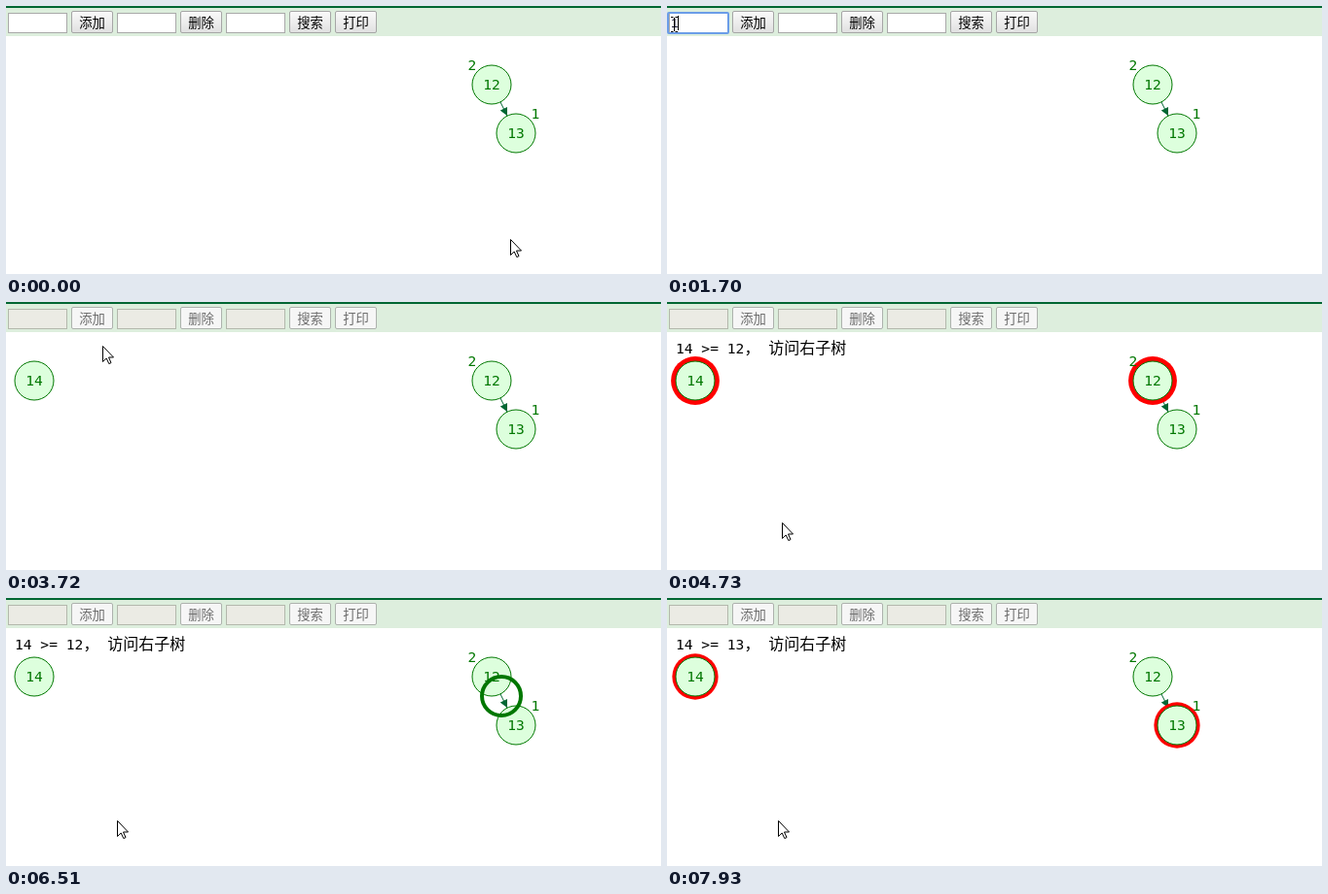
Write an HTML page that moves like this. It is 673x276 px and loops after 8 s.

```html
<!DOCTYPE html>
<html lang="zh-CN">
<head>
<meta charset="utf-8">
<title>AVL</title>
<style>
  html, body { margin: 0; width: 100%; height: 100%; overflow: hidden; background: #fff; }
  svg { display: block; width: 673px; height: 276px; }
  text { font: 16px "Noto Sans CJK SC", "Noto Sans CJK", sans-serif; }
  .mono, .node text, .height { font: 14.6px "DejaVu Sans Mono", monospace; }
  .node text, .button text { text-anchor: middle; }
  .node text, .height { fill: #070; }
  .node .body { fill: #dfd; stroke: #070; }
  .node .halo { fill: #f00; }
  .field { fill: #fff; stroke: #a9a9a9; }
  .button rect { fill: url(#face); stroke: #a6a6a6; }
  .button text { font-size: 13.33px; }
  .disabled .field { fill: #ebebe4; stroke: #b3b8ac; }
  .disabled .button text { fill: #6d6d6d; }
  .disabled .button rect { fill: #f6f6f6; stroke: #adb2ad; }
  #typed { font: 13.33px "Liberation Sans", Arial, sans-serif; fill: #101030; }
</style>
</head>
<body>
<svg viewBox="0 0 673 276">
  <defs>
    <linearGradient id="face" x2="0" y2="1">
      <stop stop-color="#fafafa"/><stop offset="1" stop-color="#e0e0e0"/>
    </linearGradient>
  </defs>
  <rect width="673" height="31" fill="#ded"/>
  <rect width="673" height="2" fill="#063"/>
  <g id="toolbar"></g>
  <rect id="focus" x="1" y="7" width="62" height="21" rx="1" fill="none" stroke="#6b9de8" stroke-width="2"/>
  <text id="typed" x="4" y="22"></text>
  <rect id="caret" y="10" width="1" height="15"/>

  <g id="message">
    <text class="mono" x="9" y="53"></text>
    <text x="79.4" y="53">，</text>
    <text x="104.2" y="53">访问右子树</text>
  </g>
  <path d="M508 99L515 113" stroke="#063"/>
  <path d="M515 113L507.8 107.6L515 104.1Z" fill="#063"/>
  <g id="nodes"></g>
  <text class="height" x="474.6" y="65.5">2</text>
  <text class="height" x="539.6" y="115.5">1</text>
  <circle id="visitor" r="20" fill="none" stroke="#070" stroke-width="4"/>

  <circle id="click" cx="89" cy="21" r="11.5" fill="#ffee30" opacity=".6"/>
  <path id="arrow" d="M.5 .5V16.5L4.2 13L6.8 18.6L9 17.6L6.5 12H11.5Z" fill="#fff" stroke="#000"/>
  <path id="beam" d="M-3 -7.5H-.5M1.5 -7.5H4M.5 -7V7M-3 7.5H-.5M1.5 7.5H4" fill="none" stroke="#000"/>
</svg>
<script>
const LOOP = 8000;
const SUBMIT = 3020, COMPARE_ROOT = 4480, DESCEND = 5940, COMPARE_CHILD = 7365;
const $ = id => document.getElementById(id);

// Toolbar: fields and buttons
const field = x => `<rect class="field" x="${x + .5}" y="7.5" width="60" height="20"/>`;
const button = (x, label) => `<g class="button">
  <rect x="${x + .5}" y="5.5" width="42" height="22" rx="1.5"/>
  <text x="${x + 21.5}" y="22">${label}</text></g>`;
$('toolbar').innerHTML = [2, 114, 226].map(field).join('') +
  button(67, '添加') + button(179, '删除') + button(291, '搜索') + button(338, '打印');

// Tree nodes
const nodes = {};
for (const [value, x, y] of [[12, 499, 81], [13, 524, 131], [14, 29, 81]]) {
  $('nodes').insertAdjacentHTML('beforeend', `<g class="node" transform="translate(${x} ${y})">
    <circle class="halo"/><circle class="body" r="20"/><text y="4.5">${value}</text></g>`);
  nodes[value] = $('nodes').lastElementChild;
}

// Mouse path: time, x, y
const mousePath = [
  [0, 518, 240], [40, 518, 240], [650, 8, 18], [840, 8, 18], [850, 7, 19],
  [2350, 7, 19], [2550, 89, 21], [3220, 89, 21], [3330, 129, 9], [3460, 129, 9],
  [3560, 132, 20], [3700, 100, 45], [3870, 80, 56], [4460, 80, 56],
  [4700, 118, 227], [4800, 118, 227], [5100, 114, 229], [LOOP, 114, 229]
];

function mouseAt(t) {
  const i = mousePath.findIndex(p => p[0] > t);
  const [t0, x0, y0] = mousePath[i - 1], [t1, x1, y1] = mousePath[i];
  const u = (t - t0) / (t1 - t0), k = u * u * (3 - 2 * u);
  return [Math.round(x0 + (x1 - x0) * k), Math.round(y0 + (y1 - y0) * k)];
}

// Triangle wave between 0 and 7; its counter restarts at 5780 ms
function pulse(t) {
  const phase = Math.abs(t - (t < 5780 ? 5150 : 5780)) / 202 % 14;
  return Math.abs(7 - phase);
}

const show = (el, on) => el.setAttribute('visibility', on ? 'visible' : 'hidden');
const place = (el, x, y) => el.setAttribute('transform', `translate(${x} ${y})`);
const within = (t, from, to) => t >= from && t < to;

function render(t) {
  const submitted = t >= SUBMIT;
  $('toolbar').classList.toggle('disabled', submitted);
  const typed = submitted || t < 1700 ? '' : t < 1930 ? '1' : '14';
  $('typed').textContent = typed;
  show($('focus'), within(t, 650, 2850));
  show($('caret'), within(t, 650, 1150) || within(t, 1700, 2430));
  $('caret').setAttribute('x', Math.floor(4 + 7.41 * typed.length));
  show($('click'), within(t, 2850, SUBMIT));

  const [x, y] = mouseAt(t);
  const overField = x >= 2 && x < 63 && y >= 7 && y < 28 && !submitted;
  show($('arrow'), !overField);
  show($('beam'), overField);
  place($('arrow'), x, y);
  place($('beam'), x, y);

  const atRoot = within(t, COMPARE_ROOT, DESCEND), atChild = t >= COMPARE_CHILD;
  const halo = { 12: atRoot, 13: atChild, 14: atRoot || atChild };
  for (const value in nodes)
    nodes[value].firstElementChild.setAttribute('r', halo[value] ? 20 + pulse(t) : 0);
  show(nodes[14], submitted);

  show($('message'), t >= COMPARE_ROOT);
  $('message').firstElementChild.textContent = `14 >= ${atChild ? 13 : 12}`;

  const u = (t - DESCEND) / (COMPARE_CHILD - DESCEND);
  show($('visitor'), u >= 0 && u < 1);
  place($('visitor'), 499 + 25 * u, 81 + 50 * u);
}

const start = performance.now();
function tick() {
  render((performance.now() - start) % LOOP);
  requestAnimationFrame(tick);
}
tick();
</script>
</body>
</html>
```
